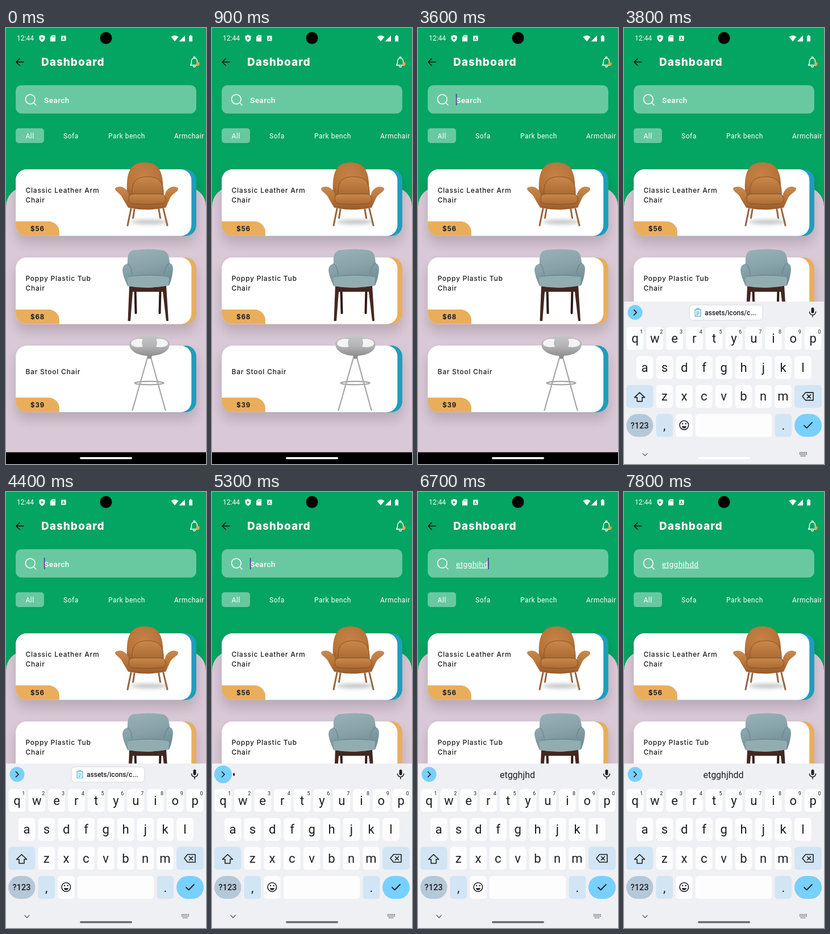
These frames come from a looping animation (352x762 px, 8000 ms). An HTML page:

```html
<!DOCTYPE html>
<html lang="en">
<head>
<meta charset="utf-8">
<title>Dashboard</title>
<style>
  html, body { margin: 0; width: 100%; height: 100%; overflow: hidden; background: #04a462; }
  svg { display: block; width: 352px; height: 762px; font-family: Roboto, sans-serif; }
  .head { font: 800 19px Inter, sans-serif; letter-spacing: 1px; fill: #fff; }
  .name { font: 500 12px Inter, sans-serif; letter-spacing: .75px; fill: #1c1c1e; }
  .price { font: 700 11.5px Inter, sans-serif; letter-spacing: .9px; fill: #1c1c1e; }
  .tab { font-size: 12px; letter-spacing: .5px; fill: #fff; }
  .field { font-size: 13.6px; letter-spacing: .43px; fill: #fff; }
  .mid { text-anchor: middle; }
  .line { fill: none; stroke-linecap: round; stroke-linejoin: round; }
  #keyboard { fill: #1d1e22; }
  #keyboard .key { font-size: 22px; }
  #keyboard .hint { font-size: 9px; }
  #keyboard .word { font-size: 16px; }
</style>
</head>
<body>
<svg viewBox="0 0 352 762">
  <defs>
    <filter id="soft" x="-20%" y="-30%" width="140%" height="170%"><feGaussianBlur stdDeviation="10"/></filter>
    <filter id="haze" x="-20%" y="-80%" width="140%" height="260%"><feGaussianBlur stdDeviation="3"/></filter>
    <radialGradient id="tanBack" cx=".45" cy=".35" r=".75"><stop stop-color="#c58245"/><stop offset=".6" stop-color="#b8743a"/><stop offset="1" stop-color="#8f5626"/></radialGradient>
    <linearGradient id="tanBody" x2="0" y2="1"><stop stop-color="#c98a50"/><stop offset=".5" stop-color="#b8753b"/><stop offset="1" stop-color="#985b2a"/></linearGradient>
    <linearGradient id="tanSeat" x2="0" y2="1"><stop stop-color="#c9884a"/><stop offset="1" stop-color="#aa6a33"/></linearGradient>
    <linearGradient id="teal" x2=".3" y2="1"><stop stop-color="#9ab3b8"/><stop offset=".55" stop-color="#87a2a8"/><stop offset="1" stop-color="#718d94"/></linearGradient>
    <linearGradient id="grey" x2="0" y2="1"><stop stop-color="#c4c4c6"/><stop offset=".5" stop-color="#b4b4b6"/><stop offset="1" stop-color="#8f8f92"/></linearGradient>
  </defs>

  <rect width="352" height="762" fill="#04a462"/>
  <path d="M0 762V312A34.200 34.200 0 0 1 34.200 277.800H317.800A34.200 34.200 0 0 1 352 312V762Z" fill="#d9c8d6"/>

  <!-- status bar -->
  <g fill="#fff">
    <text x="19" y="22" font-size="12">12:44</text>
    <path d="M63.500 12l5 2v4c0 3-2 5-5 6.500c-3-1.500-5-3.500-5-6.500v-4z"/>
    <path d="M62 15.500l4 2.500-4 2.500z" fill="#04a462"/>
    <path d="M81 12.500h6v11h-9v-8z"/>
    <path d="M81.500 14v2.500M83.500 14v2.500M85.300 14v2.500" stroke="#04a462" stroke-width=".8"/>
    <rect x="97" y="13.500" width="8.500" height="9" rx="1"/>
    <text x="101.200" y="20.800" font-size="7" font-weight="700" class="mid" fill="#04a462">A</text>
    <path d="M290.500 15.500Q297 10.500 303.500 15.500L297 23.500Z"/>
    <path d="M315 13V23.500H304.500Z"/>
    <path d="M322 14h1.500v-1.500h3V14H328v9.500h-6z"/>
  </g>
  <circle cx="176" cy="17.500" r="10.500"/>

  <!-- header -->
  <path class="line" d="M31 59.500H18.500M24 53.500L18 59.500L24 65.500" stroke="#111" stroke-width="1.600"/>
  <text class="head" x="62" y="66">Dashboard</text>
  <path class="line" d="M324.500 65c2-2 2-4 2-7 0-7 10-7 10 0 0 3 0 5 2 7zM330 51.500q1.500-2.500 3 0M329.500 67q2 2.500 4 0" stroke="#fff" stroke-width="1.400"/>
  <circle cx="337.800" cy="62.500" r="3" fill="#f2a33c"/>

  <!-- search and tabs -->
  <g fill="#fff" fill-opacity=".4">
    <rect x="17.100" y="99.900" width="317.800" height="49.600" rx="10"/>
    <rect x="17.100" y="175.200" width="49.800" height="25.700" rx="5"/>
  </g>
  <path class="line" d="M51 124.500a8.300 8.300 0 1 1-16.600 0a8.300 8.300 0 1 1 16.600 0M48.600 130.500L53 135" stroke="#fff" stroke-width="1.500"/>
  <text id="hint" class="field" x="67" y="131" font-weight="500">Search</text>
  <text id="typed" class="field" x="67" y="131" text-decoration="underline"></text>
  <rect id="caret" y="115" width="1.800" height="20" fill="#5b3fa8"/>
  <g class="tab">
    <text x="34.500" y="192.500">All</text>
    <text x="101" y="192.500">Sofa</text>
    <text x="180" y="192.500">Park bench</text>
    <text x="296" y="192.500">Armchair</text>
  </g>

  <g id="cards"></g>

  <!-- leather chair -->
  <ellipse cx="252" cy="339" rx="33" ry="4" fill="#aaa" filter="url(#haze)" opacity=".7"/>
  <path class="line" d="M220 316L214 345M277 316L284 345M226 317L223.500 332M269 317L271.500 332" stroke="#94653f" stroke-width="3"/>
  <path d="M214 300C209 252 218 235 244 235C270 235 280 252 275 300Z" fill="url(#tanBack)"/>
  <path d="M222 291C220 267 231 260 249 260C267 260 278 267 277 291Z" fill="url(#tanSeat)" stroke="#8c5224"/>
  <path d="M192 280C197 275 208 277 213 284C217 290 217 297 218 304H279C279 296 279 289 283 284C288 277 297 275 303 280C304 287 293 288 288 299L281 314Q248 321 215 314L206 299C202 288 192 287 192 280Z" fill="url(#tanBody)"/>
  <path d="M216 296Q217 290 226 290H270Q280 290 281 297Q282 306 274 307Q248 310 223 307Q215 306 216 296Z" fill="url(#tanSeat)" stroke="#875023"/>

  <!-- tub chair -->
  <path class="line" d="M227.500 457L228.500 498M271.500 457L270.500 498" stroke="#2d1a16" stroke-width="4"/>
  <path d="M217 450H282L286 512H282L276 461H223L219 512H214.500Z" fill="#44271f"/>
  <path d="M214 412C213 395 217 389 227 388Q250 385 273 388C284 389 287 396 288 411C294 413 295 420 293 430C291 440 289 446 287 450Q250 457 214 451C209 440 206 432 205 424C205 416 209 413 214 412Z" fill="url(#teal)"/>
  <path d="M214 412Q221 416 222 433M288 411Q280 415 278 433" class="line" stroke="#6d8990" stroke-width="1.400"/>
  <path d="M213 440Q214 432 226 432H276Q287 432 287 440L286 450Q250 457 215 451Z" fill="#92adb2"/>
  <path d="M216 434Q250 430 284 434" class="line" stroke="#6d8990" stroke-width="1.400"/>

  <!-- bar stool -->
  <g class="line" stroke="#a6a6a8" stroke-width="2.200">
    <path d="M249 576L222.500 668M255 576L280.500 668"/>
    <ellipse cx="252" cy="620.500" rx="25.500" ry="2.800"/>
  </g>
  <path d="M247 569h11l-2.500 9h-6z" fill="#8e8e91"/>
  <path d="M217 552C217 534 288 534 288 552C288 566 271 573 252.500 573C234 573 217 566 217 552Z" fill="url(#grey)"/>
  <path d="M220 551C221 544 233 542 241 544Q237 550 241 557C231 559 220 557 220 551ZM285 551C284 544 272 542 264 544Q268 550 264 557C274 559 285 557 285 551Z" fill="#f4f4f5"/>

  <rect y="741.500" width="352" height="21"/>

  <g id="keyboard">
    <rect y="474.500" width="352" height="300" fill="#eff0f4"/>
    <circle id="more" cx="19.500" cy="493.500" r="13" fill="#78d0ff"/>
    <path class="line" d="M17.500 489L22 493.500L17.500 498" stroke="#1d1e22" stroke-width="1.700"/>
    <ellipse id="dot" cx="38.500" cy="493.500" rx="1.500" ry="2.700"/>
    <rect x="329.500" y="485" width="5" height="10" rx="2.500"/>
    <path class="line" d="M326.500 492.500a5.500 5.500 0 0 0 11 0M332 498v3.500" stroke="#1d1e22" stroke-width="1.500"/>
    <g id="chip">
      <rect x="115" y="480.500" width="129" height="26.500" rx="6" fill="#fff" stroke="#d5d8de"/>
      <path class="line" d="M125 488.500h10v11.500h-10zM128 488v-1.500h4v1.500M127.500 492.500h5M127.500 495h5M127.500 497.300h3" stroke="#4aaee8" stroke-width="1.200"/>
      <text x="142" y="498" font-size="12" font-weight="500">assets/icons/c...</text>
    </g>
    <g id="trio" class="word mid">
      <text x="81" y="500">e</text><text x="175" y="500">so</text><text x="269" y="500">sorry</text>
      <path d="M125.500 484v19.500M225.500 484v19.500" stroke="#cfd2d8"/>
    </g>
    <text id="guess" class="word mid" x="175" y="500"></text>
    <g id="keys"></g>
    <path class="line" d="M27.500 633.500l9 8.500h-4.500v7h-9v-7h-4.500z" stroke="#1d1e22" stroke-width="1.600"/>
    <path class="line" d="M319.500 633.500h13.500v13.500h-13.500l-5.500-6.750zM322.500 637.250l6 6M328.500 637.250l-6 6" stroke="#1d1e22" stroke-width="1.600"/>
    <circle class="line" cx="105.800" cy="690.500" r="7.800" stroke="#1d1e22" stroke-width="1.600"/>
    <circle cx="103" cy="688" r="1.200"/><circle cx="108.600" cy="688" r="1.200"/>
    <path d="M101.500 692.300h8.600q-1.300 3.500-4.300 3.500t-4.300-3.500z"/>
    <path class="line" d="M317 691l4.500 4.500 9.500-9.500" stroke="#1d1e22" stroke-width="1.800"/>
    <path class="line" d="M33 740l4 4 4-4" stroke="#55575c" stroke-width="1.300"/>
    <path d="M309 738.500h13M309 741.300h13M311 744.300h9" stroke="#55575c" stroke-width="1.600" stroke-dasharray="1.700 1.100"/>
  </g>
  <rect id="pill" x="130" y="750" width="92" height="3.400" rx="1.700" fill="#fff"/>
</svg>

<script>
const $ = id => document.getElementById(id);
const svgText = (x, y, cls, s) => `<text x="${x}" y="${y}" class="${cls}">${s}</text>`;
const box = (x, y, w, h, r, fill) =>
  `<rect x="${x}" y="${y}" width="${w}" height="${h}" rx="${r}" fill="${fill}"/>`;

// product cards
const products = [
  [["Classic Leather Arm", "Chair"], "$56", "#1f9dbd"],
  [["Poppy Plastic Tub", "Chair"], "$68", "#e9ae5c"],
  [["Bar Stool Chair"], "$39", "#1f9dbd"]
];
$("cards").innerHTML = products.map(([lines, price, edge], i) => {
  const y = 247 + i * 154;
  const first = y + (lines.length > 1 ? 41 : 49.5);
  return `<g opacity=".15" filter="url(#soft)">${box(17.1, y + 12.8, 317.8, 116.4, 19, "#000")}</g>` +
    box(17.1, y, 317.8, 116.4, 18.8, edge) + box(17.1, y, 309.2, 116.4, 18.8, "#fff") +
    `<path d="M17.1 ${y + 91}h58a18.800 18.800 0 0 1 18.800 18.800v6.600h-58a18.800 18.800 0 0 1-18.800-18.800z" fill="#e9ae5c"/>` +
    lines.map((s, n) => svgText(34.5, first + n * 17, "name", s)).join("") +
    svgText(43, y + 107.7, "price", price);
}).join("");

// keyboard
const pitch = 34.8, white = "#fdfdfe", pale = "#d2e5f4";
const rows = [["qwertyuiop", 19.4, 519], ["asdfghjkl", 36.6, 569.7], ["zxcvbnm", 71.2, 620.3]];
let keys = "";
for (const [letters, x0, y] of rows)
  [...letters].forEach((c, i) => {
    const x = x0 + i * pitch;
    keys += box(x - 14.8, y, 29.6, 40, 5.5, white) + svgText(x, y + 27.5, "key mid", c);
    if (y === 519) keys += svgText(x + 11.5, y + 11, "hint mid", (i + 1) % 10);
  });
keys += box(4, 620.3, 47.5, 40, 6, pale) + box(300, 620.3, 48, 40, 6, pale);
for (const [x, w, r, fill] of [[4, 47.5, 20, "#b4c8d8"], [56.4, 29.6, 5.5, pale], [91, 29.6, 5.5, white],
  [125.8, 134.6, 5.5, white], [265.6, 29.6, 5.5, pale], [300, 48, 20, "#78d0ff"]])
  keys += box(x, 671, w, 40, r, fill);
keys += `<text x="27.5" y="696" class="mid" font-size="14.5" font-weight="500">?123</text>` +
  svgText(71.2, 698.5, "key mid", ",") + svgText(280.4, 698.5, "key mid", ".");
$("keys").innerHTML = keys;

// timeline, in ms
const loop = 8000, word = "etgghjhdd";
const strokes = [5800, 5900, 6000, 6100, 6200, 6400, 6500, 6700, 6800];
const caretOn = [[3600, 3800], [4100, 4600], [5000, 5500], [5800, 7300]];
const show = (id, on) => { $(id).style.display = on ? "" : "none"; };

function draw(t) {
  const text = word.slice(0, strokes.filter(s => t >= s).length);
  $("typed").textContent = text;
  show("hint", !text);
  $("caret").setAttribute("x", text ? 66.8 + $("typed").getComputedTextLength() : 66.7);
  show("caret", caretOn.some(([a, b]) => t >= a && t < b));

  show("keyboard", t >= 3800);
  $("keyboard").setAttribute("transform", `translate(0 ${t < 3900 ? 3.6 : 0})`);
  $("pill").setAttribute("fill", t >= 3900 ? "#6b6c70" : "#fff");

  show("chip", t < 5200);
  const swell = t >= 5200 && t < 5400;
  $("more").setAttribute("r", swell ? 15.5 : 13);
  show("dot", t >= 5300 && t < 5400);
  show("trio", t >= 5900 && t < 6500);
  $("guess").textContent = t >= 6500 ? text : "";
}

const start = performance.now();
function tick() {
  draw((performance.now() - start) % loop);
  requestAnimationFrame(tick);
}
tick();
</script>
</body>
</html>
```
